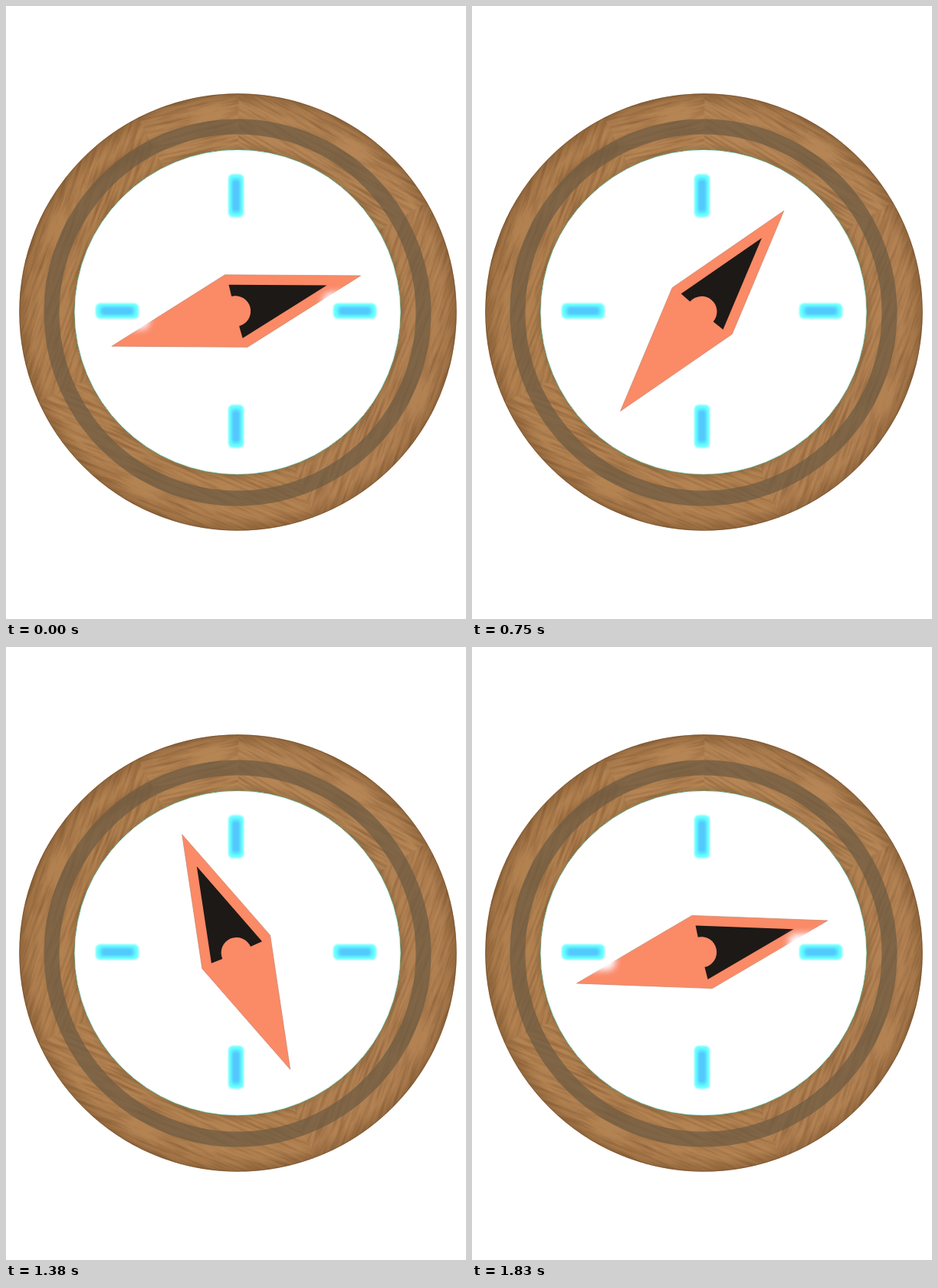
An HTML page for the animation above (1890 ms loop, 600 by 800 pixels).

```html
<!DOCTYPE html>
<html lang="en">
<head>
<meta charset="utf-8">
<title>Compass</title>
<style>
  html, body { margin: 0; width: 100%; height: 100%; overflow: hidden; background: #fff; }
  svg { position: absolute; inset: 0; width: 100%; height: 100%; }
  .glow { mix-blend-mode: screen; }
</style>
</head>
<body>
<svg viewBox="0 0 600 800">
  <defs>
    <filter id="grain" filterUnits="userSpaceOnUse" x="-300" y="-300" width="600" height="600"
        color-interpolation-filters="sRGB">
      <feTurbulence type="fractalNoise" baseFrequency=".02 .25" numOctaves="4" seed="8"/>
      <feColorMatrix values="0 0 0 0 .42  0 0 0 0 .27  0 0 0 0 .14  .9 0 0 0 -.34"/>
      <feComposite in2="SourceGraphic" operator="in" result="lines"/>
      <feMerge><feMergeNode in="SourceGraphic"/><feMergeNode in="lines"/></feMerge>
    </filter>
    <filter id="soft" x="-30%" y="-30%" width="160%" height="160%">
      <feGaussianBlur stdDeviation="5"/>
    </filter>
    <radialGradient id="shade" gradientUnits="userSpaceOnUse" cx="302.5" cy="399.5" r="285">
      <stop offset=".745" stop-color="#6b5832" stop-opacity=".25"/>
      <stop offset=".775" stop-color="#6b5832" stop-opacity="0"/>
      <stop offset=".94" stop-color="#5e3c1a" stop-opacity="0"/>
      <stop offset="1" stop-color="#5e3c1a" stop-opacity=".32"/>
    </radialGradient>
  </defs>
  <g id="wood" fill="none" stroke-width="74"></g>
  <g fill="none" stroke="#6d4526" stroke-width="7" opacity=".4" filter="url(#soft)">
    <path d="M112 232Q148 194 196 180M128 222Q158 198 184 192"/>
  </g>
  <g fill="none">
    <circle cx="302.5" cy="399.5" r="248" stroke="url(#shade)" stroke-width="74"/>
    <circle cx="302" cy="400" r="242.5" stroke="#6b5a42" stroke-opacity=".7" stroke-width="20"/>
    <circle cx="302.5" cy="399.5" r="284.7" stroke="#6b4824" stroke-opacity=".7"/>
  </g>
</svg>

<svg viewBox="0 0 600 800">
  <defs>
    <filter id="halo" x="-60%" y="-40%" width="220%" height="180%">
      <feGaussianBlur stdDeviation="4"/>
    </filter>
    <filter id="edge" x="-30%" y="-20%" width="160%" height="140%">
      <feGaussianBlur stdDeviation="1"/>
    </filter>
    <g id="light" filter="url(#halo)">
      <rect x="-26" y="-44" width="52" height="88" rx="12" fill="#8f78ff" opacity=".35"/>
      <rect x="-23" y="-41" width="46" height="82" rx="9" fill="#fff"/>
    </g>
    <g id="tick" filter="url(#edge)">
      <rect x="-10" y="-28" width="20" height="56" rx="6" fill="#6ff"/>
      <rect x="-6.5" y="-23.5" width="13" height="47" rx="5" fill="#5ae4ff"/>
      <rect x="-4.5" y="-20" width="9" height="40" rx="4" fill="#52c8fd"/>
    </g>
  </defs>
  <ellipse cx="302" cy="399.5" rx="213" ry="212.2" fill="#fff" stroke="#7d7a4c"/>
  <ellipse cx="302" cy="399.5" rx="212.2" ry="211.4" fill="none" stroke="#8ff" stroke-opacity=".5"/>
  <g id="needle">
    <path d="M0-168.7L49.4-1.3L0 168.7L-49.4 1.3Z" fill="#fb8a66" stroke="#c98a74" stroke-width=".7"/>
    <path d="M0-123L36.5 1.6H20A20 20 0 0 0-20 .6L-35.5 0Z" fill="#1d1917"/>
  </g>
  <g id="glows" class="glow"></g>
  <g id="ticks"></g>
</svg>

<script>
  const LOOP = 1890;
  const byId = id => document.getElementById(id);

  // Planks: start and end bearing in degrees, colour.
  const planks = [
    [0, 60, '#b58555'], [60, 160, '#b38253'], [160, 246, '#b48352'],
    [246, 333, '#b28150'], [333, 360, '#b68554']
  ];
  byId('wood').innerHTML = planks.map(([from, to, colour]) => {
    const half = (to - from + .3) * Math.PI / 360;
    const x = 248 * Math.sin(half), y = -248 * Math.cos(half);
    return `<path d="M${-x} ${y}A248 248 0 0 1 ${x} ${y}" stroke="${colour}" filter="url(#grain)"
      transform="translate(302.5 399.5) rotate(${(from + to) / 2})"/>`;
  }).join('');

  const places = [[300, 247.5, 0], [455, 398, 90], [300, 548.5, 0], [145, 398, 90]];
  const stamp = id => places.map(([x, y, turn]) =>
    `<use href="#${id}" transform="translate(${x} ${y}) rotate(${turn})"/>`).join('');
  byId('glows').innerHTML = stamp('light');
  byId('ticks').innerHTML = stamp('tick');

  // Swing of the needle: time in ms, bearing in degrees, speed in degrees per ms.
  const swing = [
    [0, 74.15, -.05], [390, 49.8, -.06], [630, 41, 0], [750, 39.2, -.07],
    [930, 14.6, -.155], [1280, -30.5, 0], [1380, -24.7, .12],
    [1650, 30.25, .27], [1830, 75.95, .13]
  ];

  function bearing(t) {
    const i = swing.findLastIndex(key => key[0] <= t);
    if (i === swing.length - 1) return swing[i][1];
    const [t0, a, va] = swing[i], [t1, b, vb] = swing[i + 1];
    const span = t1 - t0, u = (t - t0) / span, w = 1 - u;
    return a * w * w * (1 + 2 * u) + b * u * u * (1 + 2 * w)
      + span * u * w * (va * w - vb * u);
  }

  // The needle moves in 90 ms steps, with two longer rests.
  function held(t) {
    if (t < 300) return Math.min(2, Math.floor(t / 90)) * 90;
    const step = 30 + Math.floor((t - 30) / 90) * 90;
    return step === 660 ? 570 : step;
  }

  const needle = byId('needle');
  let start;
  function draw(now) {
    start ??= now;
    const angle = bearing(held((now - start) % LOOP));
    needle.setAttribute('transform', `translate(300.2 398) rotate(${angle.toFixed(2)})`);
    requestAnimationFrame(draw);
  }
  requestAnimationFrame(draw);
</script>
</body>
</html>
```
